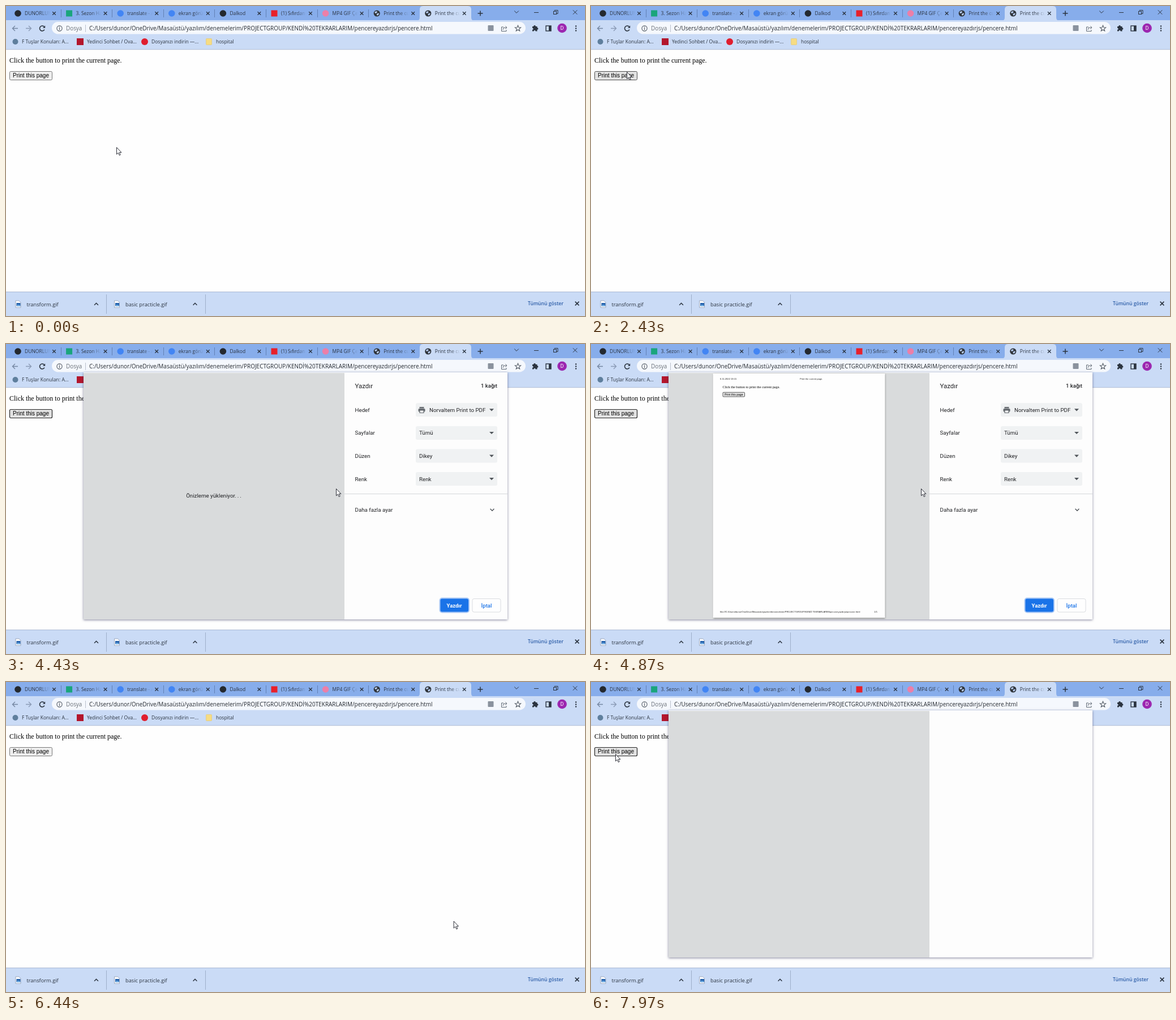
Animation, 1023 px wide and 547 px high, one loop 8000 ms. Source, as an HTML page with a canvas:

```html
<!DOCTYPE html>
<html lang="tr">
<head>
<meta charset="utf-8">
<title>Print the current page</title>
<style>
html, body { margin: 0; width: 100%; height: 100%; overflow: hidden; background: #fefefe; }
canvas { display: block; width: 100vw; height: 100vh; }
</style>
</head>
<body>
<canvas id="stage"></canvas>
<script>
const W = 1023, H = 547, LOOP = 8000;
const UI = '"Open Sans", "Noto Sans", sans-serif';
const ROBOTO = 'Roboto, sans-serif';
const SERIF = '"Liberation Serif", serif';
const ARIAL = '"Liberation Sans", sans-serif';
const STRIP = '#87adeb', BAR = '#cadbf6', INK = '#2b3440', WHITE = '#fefefe', PAPER = '#fdfdfd';
const FOLDERS = '/OneDrive/Masaüstü/yazılım/denemelerim/PROJECTGROUP/KENDİ';
const PATH_END = 'TEKRARLARIM/pencereyazdırjs/pencere.html';
const USER_DIR = 'C:/Users/dunor';
const SENTENCE = 'Click the button to print the current page.';

const canvas = document.getElementById('stage');
const ctx = canvas.getContext('2d');
const dpr = window.devicePixelRatio || 1;
canvas.width = W * dpr;
canvas.height = H * dpr;
ctx.scale(dpr, dpr);

function rect(x, y, w, h, color) {
  ctx.fillStyle = color;
  ctx.fillRect(x, y, w, h);
}

function box(x, y, w, h, r, fill, stroke, lw = 1) {
  ctx.beginPath();
  ctx.roundRect(x, y, w, h, r);
  if (fill) { ctx.fillStyle = fill; ctx.fill(); }
  if (stroke) { ctx.strokeStyle = stroke; ctx.lineWidth = lw; ctx.stroke(); }
}

function dot(x, y, r, color) {
  ctx.beginPath();
  ctx.arc(x, y, r, 0, 7);
  ctx.fillStyle = color;
  ctx.fill();
}

function ring(x, y, r, color, lw = 1) {
  ctx.beginPath();
  ctx.arc(x, y, r, 0, 7);
  ctx.strokeStyle = color;
  ctx.lineWidth = lw;
  ctx.stroke();
}

// Each line is a flat list: x1, y1, x2, y2, ...
function lines(x, y, color, lw, ...list) {
  ctx.beginPath();
  for (const p of list) {
    ctx.moveTo(x + p[0], y + p[1]);
    for (let i = 2; i < p.length; i += 2) ctx.lineTo(x + p[i], y + p[i + 1]);
  }
  ctx.strokeStyle = color;
  ctx.lineWidth = lw;
  ctx.stroke();
}

function poly(x, y, p, fill) {
  ctx.beginPath();
  for (let i = 0; i < p.length; i += 2) ctx.lineTo(x + p[i], y + p[i + 1]);
  ctx.closePath();
  if (fill) { ctx.fillStyle = fill; ctx.fill(); }
}

// y is the baseline
function text(str, x, y, size, family, color = INK, weight = 400, align = 'left') {
  ctx.font = `${weight} ${size}px ${family}`;
  ctx.textAlign = align;
  ctx.fillStyle = color;
  ctx.fillText(str, x, y);
}

function cross(x, y, r, color = INK, lw = 1.3) {
  lines(x, y, color, lw, [-r, -r, r, r], [r, -r, -r, r]);
}

function chevron(x, y, r, dir, color = INK, lw = 1.3) {
  lines(x, y, color, lw, [-r, -dir * r / 2, 0, dir * r / 2, r, -dir * r / 2]);
}

function globe(x, y) {
  dot(x, y, 5.6, '#30353b');
  poly(x, y, [-4, -2.2, -1, -4, 1.2, -2.6, -0.6, -0.8, -2.6, 0.2], '#b8cdf0');
  poly(x, y, [0.2, 0.6, 3.6, -0.6, 3.8, 1.6, 1.2, 4, -0.4, 2.4], '#b8cdf0');
}

const square = color => (x, y) => rect(x - 5.5, y - 5.5, 11, 11, color);
const disc = color => (x, y) => dot(x, y, 5.8, color);
const TABS = [
  ['DUNORLUM', disc('#24292f')], ['3. Sezon Hafta', square('#1aa57c')],
  ['translate - Arama', disc('#4285f4')], ['ekran görüntüsü', disc('#4285f4')],
  ['Dalkod', disc('#24292f')], ['(1) Sıfırdan', square('#e8202a')],
  ['MP4 GIF Çevirici', disc('#ec7fa8')], ['Print the current', globe], ['Print the current', globe]
];

function tabStrip() {
  rect(0, 0, W, 26, STRIP);
  ctx.beginPath();
  ctx.moveTo(725, 26);
  ctx.quadraticCurveTo(731, 26, 731, 20);
  ctx.lineTo(731, 6);
  ctx.quadraticCurveTo(731, 0, 737, 0);
  ctx.lineTo(816, 0);
  ctx.quadraticCurveTo(822, 0, 822, 6);
  ctx.lineTo(822, 20);
  ctx.quadraticCurveTo(822, 26, 828, 26);
  ctx.fillStyle = BAR;
  ctx.fill();

  TABS.forEach(([title, icon], i) => {
    const x = 21 + 90.6 * i;
    icon(x, 13);
    const fade = ctx.createLinearGradient(x + 38, 0, x + 57, 0);
    fade.addColorStop(0, '#28313f');
    fade.addColorStop(1, 'rgba(40,49,63,0)');
    ctx.save();
    ctx.beginPath();
    ctx.rect(x + 11, 2, 46, 22);
    ctx.clip();
    text(title, x + 12, 16, 8.5, UI, fade);
    ctx.restore();
    cross(x + 64, 13, 2.8);
    if (i > 0 && i < 8) rect(Math.round(x - 15), 6, 1, 14, '#6281b5');
  });

  lines(838, 13, INK, 1.5, [-4.5, 0, 4.5, 0], [0, -4.5, 0, 4.5]);
  chevron(902, 10.5, 3.8, 1, INK, 1);
  lines(937, 11.5, INK, 1, [-4, 0, 4, 0]);
  ctx.strokeRect(967.5, 9.5, 5, 5);
  lines(967, 7.5, INK, 1, [2, 1, 2, 0, 8, 0, 8, 6, 6, 6]);
  cross(1005.5, 11, 3.7, INK, 1);
}

function addressBar() {
  rect(0, 25, W, 52, BAR);
  lines(16, 39.5, '#7688a3', 1.4, [5, 0, -4.5, 0], [0, -4.5, -4.5, 0, 0, 4.5]);
  lines(40, 39.5, '#8b9bb6', 1.4, [-5, 0, 4.5, 0], [0, -4.5, 4.5, 0, 0, 4.5]);
  ctx.beginPath();
  ctx.arc(64, 39.5, 4.5, 0.5, 5.5);
  ctx.strokeStyle = INK;
  ctx.lineWidth = 1.6;
  ctx.stroke();
  poly(64, 39.5, [1, -0.8, 5.2, -0.8, 5.2, -5], INK);

  box(81, 28, 837, 21.5, 10.7, '#f5f8fd');
  ring(94.5, 39.5, 4.6, '#505862', 1.1);
  lines(94.5, 39.5, '#505862', 1.2, [0, -0.7, 0, 2.6], [0, -2.7, 0, -1.5]);
  text('Dosya', 106, 43, 9.9, UI, '#6a7077');
  rect(140, 33, 1, 13, '#b9c0cb');
  text(USER_DIR + FOLDERS + '%20' + PATH_END, 147, 43, 9.97, UI, '#252a30');

  box(851.5, 34, 10, 10, 1, '#8a929e');
  lines(880, 40, '#5f6873', 1, [-1, -3, -4.5, -3, -4.5, 4.5, 4, 4.5, 4, 2], [-2, 2, -1, -1.5, 5, -2], [2.5, -4.5, 5, -2, 2.5, 0.5]);
  const star = [];
  for (let i = 0; i < 10; i++) {
    const a = i * Math.PI / 5 - Math.PI / 2, r = i % 2 ? 2.3 : 5.4;
    star.push(r * Math.cos(a), r * Math.sin(a));
  }
  poly(904.5, 39.7, star);
  ctx.lineWidth = 1.1;
  ctx.strokeStyle = '#505862';
  ctx.stroke();

  rect(930, 36, 8.5, 8.5, INK);
  dot(934, 35.8, 1.8, INK);
  dot(938.6, 40, 1.8, INK);
  dot(930, 40.3, 1.5, BAR);
  dot(934, 44.3, 1.5, BAR);
  ctx.strokeStyle = INK;
  ctx.lineWidth = 1.4;
  ctx.strokeRect(954, 35, 9, 9);
  rect(959, 35, 4, 9, INK);
  dot(982.5, 39, 8.3, '#9c27b0');
  text('D', 982.5, 42.3, 9, ROBOTO, '#fff', 400, 'center');
  for (const d of [-4, 0, 4]) dot(1007, 39.5 + d, 1.2, INK);
}

function bookmarks() {
  dot(16.5, 63, 5, '#5f7f9d');
  text('F Tuşlar Konuları: A...', 28, 66, 8.5, UI);
  rect(125, 57, 12, 12, '#b3162c');
  text('Yedinci Sohbet / Ova...', 143, 66, 8.5, UI);
  dot(245, 63, 6, '#e01e2e');
  text('Dosyanızı indirin —...', 257, 66, 8.5, UI);
  box(353.5, 57.5, 10, 11, 1, '#f6dc83', '#e3c76d', 0.6);
  text('hospital', 371, 66, 8.5, UI);
  rect(0, 76.4, W, 0.8, '#a9b7cd');
}

function downloads() {
  rect(0, 504, W, 43, BAR);
  rect(0, 504, W, 1, '#a9b9d3');
  [['transform.gif', 0], ['basic practicle.gif', 174.5]].forEach(([name, x]) => {
    poly(x + 17, 520, [0, 0, 6, 0, 9, 3, 9, 12, 0, 12], '#fbfcff');
    lines(x + 17, 520, '#8190a8', 0.7, [0, 0, 6, 0, 9, 3, 9, 12, 0, 12, 0, 0]);
    rect(x + 18.5, 524, 7, 5.5, '#2563ae');
    poly(x + 18.5, 524, [0, 5.5, 2.5, 2.5, 4, 4, 5.2, 3, 7, 5.5], '#78b5e8');
    text(name, x + 36.5, 529.5, 9.25, UI);
    chevron(x + 159.5, 526, 3.4, -1, INK, 1.5);
    rect(Math.round(x + 177), 509, 1, 34, '#9eafca');
  });
  text('Tümünü göster', 922, 528, 8.6, UI, '#2d5ea8', 600);
  cross(1009, 525, 3.4, INK, 1.6);
}

function page(focused, hover) {
  rect(0, 77, W, 427, WHITE);
  text(SENTENCE, 6, 100, 12, SERIF, '#000');
  const edge = focused ? '#262626' : hover ? '#4f4f4f' : '#777';
  box(6.5, 115.5, 75, 15, 2, hover ? '#e2e2e2' : '#efefef', edge, focused ? 1.2 : 1);
  text('Print this page', 44, 126.3, 10, ARIAL, '#000', 400, 'center');
}

function preview() {
  ctx.save();
  ctx.shadowColor = 'rgba(0,0,0,.45)';
  ctx.shadowBlur = 3 * dpr;
  ctx.shadowOffsetY = dpr;
  rect(215.5, 52, 304, 431, WHITE);
  ctx.restore();
  text('6.11.2022 19:15', 228, 62.5, 4.1, ARIAL, '#222');
  text('Print the current page.', 369, 62.5, 4.1, ARIAL, '#222');
  text(SENTENCE, 232.5, 77.5, 6.13, SERIF, '#000');
  box(233, 85.3, 38.5, 7.7, 1, '#e4e4e4', '#333', 0.8);
  text('Print this page', 252.2, 90.9, 5.1, ARIAL, '#000', 400, 'center');
  text('file:///' + USER_DIR + FOLDERS + ' ' + PATH_END, 228, 474, 4.1, ARIAL, '#222');
  text('1/1', 506, 474, 4.1, ARIAL, '#222', 400, 'right');
}

const ROWS = [['Hedef', 'Norvaltem Print to PDF'], ['Sayfalar', 'Tümü'], ['Düzen', 'Dikey'], ['Renk', 'Renk']];

function settings() {
  const ink = '#202124';
  text('Yazdır', 616.5, 78, 11.5, ROBOTO, ink);
  text('1 kağıt', 868, 77.3, 9.5, ROBOTO, ink, 500, 'right');
  ROWS.forEach(([label, value], i) => {
    const y = 116.3 + 40.6 * i;
    text(label, 616.5, y + 3.5, 9.75, ROBOTO, ink);
    box(724, y - 12, 144, 24, 3, '#f0f2f3');
    text(value, i ? 730 : 748, y + 3.5, 9.75, ROBOTO, ink);
    poly(858, y, [-4, -2, 4, -2, 0, 2.2], '#50555a');
  });
  rect(730.5, 111, 8, 2.5, '#666b70');
  box(728.5, 114, 12, 5.5, 1.5, '#666b70');
  box(731, 117, 7, 4.5, 0, '#f0f2f3', '#666b70', 1.2);
  rect(598, 264, 288, 1, '#d5d7da');
  text('Daha fazla ayar', 616.5, 295.5, 9.75, ROBOTO, ink);
  chevron(859, 292.5, 3.4, 1, '#4d5257', 1.4);
  box(766.5, 448.5, 51.5, 25, 4, '#1a73e8', '#a5c6f6', 2);
  text('Yazdır', 792, 464.6, 9.5, ROBOTO, '#fff', 700, 'center');
  box(824, 449.5, 50, 23.5, 3, WHITE, '#dadce0');
  text('İptal', 849, 464.6, 9.5, ROBOTO, '#1a73e8', 500, 'center');
}

// k: 1 = hidden and tilted, 0 = settled
function dialog(k, age, hasPreview) {
  if (k >= 1) return;
  const top = 50 - 8 * k, bottom = 486 + 11 * k, spread = 18 * k;
  ctx.save();
  ctx.globalAlpha = 1 - Math.pow(k, 4.6);
  ctx.shadowColor = 'rgba(50,50,90,.6)';
  ctx.shadowBlur = 4 * dpr;
  ctx.shadowOffsetY = dpr;
  poly(0, 0, [137, top, 886, top, 886 + spread, bottom, 137 - spread, bottom], PAPER);
  ctx.restore();
  if (k > 0 || age < 190) return;
  rect(137, 51, 461, 435, '#d9dbdc');
  if (age < 600) return;
  if (hasPreview) preview();
  else text('Önizleme yükleniyor.\u2009.\u2009.', 367, 271, 9.75, ROBOTO, '#202124', 400, 'center');
  settings();
}

const clamp = v => Math.max(0, Math.min(1, v));
const ease = v => v * v * (3 - 2 * v);

// time, x, y
const POINTS = [
  [0, 195, 249], [900, 195, 249], [2050, 63, 116], [2600, 63, 116], [3100, 64, 118], [3480, 64, 118],
  [4250, 583, 255], [4950, 583, 255], [5780, 850, 445], [6250, 850, 445], [7400, 43, 127], [LOOP, 43, 127]
];

function pointer(t) {
  const i = Math.max(1, POINTS.findIndex(p => p[0] > t));
  const [a, b] = [POINTS[i - 1], POINTS[i]];
  const e = ease(clamp((t - a[0]) / (b[0] - a[0])));
  return [a[1] + (b[1] - a[1]) * e, a[2] + (b[2] - a[2]) * e];
}

function arrow(x, y) {
  poly(x + 0.5, y + 0.5, [0, 0, 0, 12.2, 2.8, 9.6, 4.8, 14, 6.7, 13.1, 4.8, 8.9, 8.4, 8.9], '#fff');
  ctx.strokeStyle = '#171923';
  ctx.lineWidth = 0.9;
  ctx.stroke();
}

const FIRST = 3270, SECOND = 7740, CLOSE = 6190, OPEN_MS = 180;

function draw(t) {
  const [x, y] = pointer(t);
  const over = x > 6 && x < 82 && y > 115 && y < 131;
  const focused = (t > 2900 && t < 6400) || t > 7600;
  const hover = t > 7200 ? t > 7560 : over || (t > FIRST && t < CLOSE);
  ctx.clearRect(0, 0, W, H);
  tabStrip();
  addressBar();
  page(focused, hover);
  bookmarks();
  downloads();
  const start = t < SECOND ? FIRST : SECOND;
  const opening = 1 - clamp((t - start) / OPEN_MS);
  const closing = t < SECOND ? clamp((t - CLOSE) / 140) : 0;
  dialog(Math.max(opening, closing), t - start, t > 4700 && t < SECOND);
  arrow(x, y);
}

const began = performance.now();
function tick() {
  draw((performance.now() - began) % LOOP);
  requestAnimationFrame(tick);
}
tick();
</script>
</body>
</html>
```
